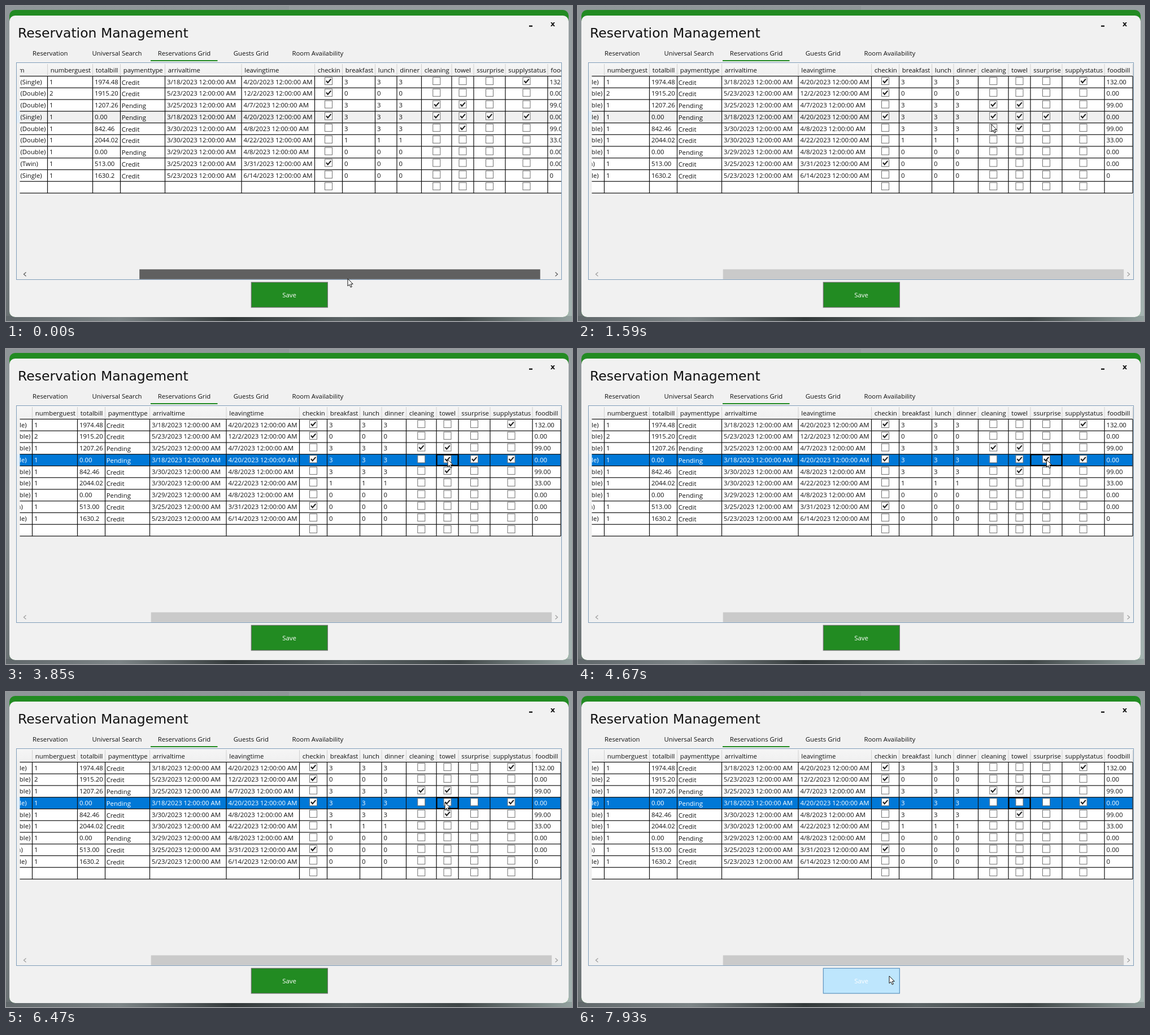
An HTML page with a canvas that plays this animation: 1002x559 px, repeating every 7990 ms.

```html
<!DOCTYPE html>
<html lang="en">
<head>
<meta charset="utf-8">
<title>Reservation Management</title>
<style>
html, body { margin: 0; width: 100%; height: 100%; overflow: hidden; background: #858d90; }
canvas { display: block; }
</style>
</head>
<body>
<canvas id="stage" width="1002" height="559"></canvas>
<script>
const ctx = document.getElementById('stage').getContext('2d');
const LOOP = 7990, STEP = 57;
const UI = '11.35px "Open Sans", "Noto Sans", sans-serif';
const GREEN = '#228b22', INK = '#111';
const LEFT = 25, TOP = 124.5, ROW_H = 20.75, SELECTED = 3;

// Each column's name and width, as laid out at the far right scroll position
let edge = -40;
const columns = [
  ['', 86.5], ['numberguest', 80], ['totalbill', 49], ['paymenttype', 79], ['arrivaltime', 135.5],
  ['leavingtime', 129.5], ['checkin', 49], ['breakfast', 58], ['lunch', 38.5], ['dinner', 43.5],
  ['cleaning', 53.5], ['towel', 39], ['ssurprise', 56], ['supplystatus', 75], ['foodbill', 50]
].map(([name, width]) => ({ name, width, x: (edge += width) - width }));
const PAYMENT = 3;

// room | guests | bill | payment | arrival | leaving | each meal | checked columns | food bill
const rows = [
  'Single|1|1974.48|Credit|3/18|4/20|3|checkin supplystatus|132.00',
  'Double|2|1915.20|Credit|5/23|12/2|0|checkin|0.00',
  'Double|1|1207.26|Pending|3/25|4/7|3|cleaning towel|99.00',
  'Single|1|0.00|Pending|3/18|4/20|3|checkin cleaning towel ssurprise supplystatus|0.00',
  'Double|1|842.46|Credit|3/30|4/8|3|towel|99.00',
  'Double|1|2044.02|Credit|3/30|4/22|1||33.00',
  'Double|1|0.00|Pending|3/29|4/8|0||0.00',
  'Twin|1|513.00|Credit|3/25|3/31|0|checkin|0.00',
  'Single|1|1630.2|Credit|5/23|6/14|0||0',
  '||||||||'
].map(line => {
  const [room, guests, bill, pay, from, to, meal, checked, food] = line.split('|');
  const date = d => d && d + '/2023 12:00:00 AM';
  const has = name => checked.split(' ').includes(name);
  return [room && `(${room})`, guests, bill, pay, date(from), date(to), has('checkin'), meal, meal, meal,
    ...['cleaning', 'towel', 'ssurprise', 'supplystatus'].map(has), food];
});

// When each cell of the selected row is focused and cleared
const focusAt = [[2230, 'cleaning'], [3850, 'towel'], [4460, 'ssurprise'], [6470, 'towel']];
const clearAt = { cleaning: 3100, ssurprise: 5600, towel: 6980 };

// Pointer moves: start, end, target x, target y
const moves = [
  [120, 230, 631, 486],
  [980, 1650, 735, 202],
  [1900, 2080, 734, 199],
  [2420, 2540, 747, 199],
  [2750, 2860, 735, 197],
  [3160, 3510, 782, 196],
  [3900, 4120, 831, 196],
  [4670, 4760, 824, 198],
  [5640, 5890, 790, 197],
  [6010, 6130, 777, 196],
  [7260, 7780, 551, 504]
];

// Advances in even steps, the first one at the start time
function progress(t, start, end) {
  if (t < start) return 0;
  if (t >= end) return 1;
  const last = Math.round((end - start) / STEP);
  return (Math.floor((t - start) / (end - start) * last) + 1) / (last + 1);
}

const ease = p => p ** 3 * (10 - 15 * p + 6 * p * p);

function pointer(t) {
  let x = 605, y = 484;
  for (const [start, end, tx, ty] of moves) {
    const e = ease(progress(t, start, end));
    x += (tx - x) * e;
    y += (ty - y) * e;
  }
  return [x, y];
}

function rect(x, y, w, h, color) {
  ctx.fillStyle = color;
  ctx.fillRect(x, y, w, h);
}

function rounded(x, y, w, h, color) {
  ctx.beginPath();
  ctx.roundRect(x, y, w, h, 10);
  ctx.fillStyle = color;
  ctx.fill();
}

function frame(x, y, w, h, color, width = 1) {
  ctx.strokeStyle = color;
  ctx.lineWidth = width;
  ctx.strokeRect(x, y, w, h);
}

function poly(points, color, width) {
  ctx.beginPath();
  points.forEach(([x, y]) => ctx.lineTo(x, y));
  ctx.strokeStyle = color;
  ctx.lineWidth = width;
  ctx.stroke();
}

function text(str, x, y, color = INK, font = UI, align = 'left') {
  ctx.font = font;
  ctx.textAlign = align;
  ctx.fillStyle = color;
  ctx.fillText(str, x, y);
}

function gradient(x1, y1, ...colors) {
  const g = ctx.createLinearGradient(0, 0, x1, y1);
  colors.forEach((c, i) => g.addColorStop(i / (colors.length - 1), c));
  return g;
}

function drawWindow() {
  rect(0, 0, 501, 559, gradient(0, 559, '#8f9699', '#878e91', '#6a7173'));
  rect(501, 0, 501, 559, gradient(0, 559, '#959c9f', '#9aa4a5', '#a5b4b1'));
  rect(0, 550, 1002, 9, gradient(1002, 0, '#60676a', '#7d8587', '#33393a', '#5b6365', '#3f4647', '#93a19f'));
  rounded(6, 7, 990, 545, GREEN);
  rounded(6, 17, 990, 535, '#f1f1f1');

  text('Reservation Management', 21, 56, INK, '23.5px "DejaVu Sans", sans-serif');
  rect(926, 34.5, 6, 2.3, INK);
  text('x', 968, 36, INK, 'bold 13px "DejaVu Sans", sans-serif', 'center');
  [['Reservation', 47], ['Universal Search', 152.6], ['Reservations Grid', 268.7], ['Guests Grid', 402.8], ['Room Availability', 506.5]]
    .forEach(([label, x]) => text(label, x, 88));
  rect(256, 96, 118.5, 2, GREEN);
}

function drawCheck(x, y, on) {
  rect(x - 6.5, y - 6.5, 13, 13, '#fff');
  frame(x - 6.5, y - 6.5, 13, 13, '#707070');
  if (on) poly([[x - 4, y - .3], [x - 1.3, y + 3], [x + 4.3, y - 3.5]], '#212121', 2.2);
}

function drawCell(value, column, x, y, color, cleared) {
  if (typeof value === 'boolean') {
    drawCheck(x + column.width / 2, y + 8.6, value && !cleared);
  } else {
    const payment = column === columns[PAYMENT];
    text(value, column.name ? x + (payment ? 2.2 : 3.4) : x + 38.4, y + (payment ? 15 : 14), color);
  }
}

function drawGrid(t, shift) {
  const focus = focusAt.findLast(([start]) => t >= start);
  const bottom = TOP + ROW_H * rows.length, right = edge + shift;
  const selectedY = TOP + SELECTED * ROW_H;

  rect(19, 101, 964, 384, '#f0f0f0');
  rect(19, 101, 964, 23, gradient(0, 124, '#fff', '#fff', '#f0f0f0'));
  rect(19, selectedY, 6, ROW_H, '#e3eff9');
  ctx.save();
  ctx.beginPath();
  ctx.rect(LEFT - .5, 101, 958.5, 384);
  ctx.clip();
  rect(0, TOP, right, bottom - TOP, '#fff');
  rect(0, selectedY, right, ROW_H, focus ? '#0078d7' : '#f0f0f0');
  for (let r = 0; r <= rows.length; r++) rect(0, TOP + r * ROW_H - .6, right, 1.2, INK);

  text('m', 5.5 + shift, 118, INK, UI, 'right');
  columns.forEach((column, c) => {
    const x = column.x + shift, end = x + column.width;
    text(column.name, x + 5.3, 118);
    rect(end - .5, 103, 1, 20, '#cfcfcf');
    rect(end - .6, TOP, 1.2, bottom - TOP, INK);
    rows.forEach((cells, r) => {
      const chosen = r === SELECTED;
      drawCell(cells[c], column, x, TOP + r * ROW_H, chosen && focus ? '#fff' : INK, chosen && t >= clearAt[column.name]);
    });
    if (focus && focus[1] === column.name) frame(x + .5, selectedY + .7, column.width - 1, ROW_H - 1.4, '#000', 2);
  });
  ctx.restore();
  frame(18.5, 100.5, 965, 385, '#7f9db9');
}

function drawScrollbar(t, travel, y) {
  const pressed = t < 980, hover = y >= 467 && y < 485;
  const arrow = pressed || hover ? '#606060' : '#a0a0a0';
  rect(24, 467, 959, 18, '#f0f0f0');
  rect(236.2 + travel, 467.3, 709.5, 17.5, pressed ? '#606060' : hover ? '#a6a6a6' : '#cacaca');
  [[33.5, 1], [974.5, -1]].forEach(([x, d]) =>
    poly([[x + 2 * d, 472.5], [x - 2 * d, 476], [x + 2 * d, 479.5]], arrow, 1.3));
}

function drawSave(x, y) {
  const hover = x >= 434 && x <= 569 && y >= 490 && y <= 535;
  rect(434, 490, 135.5, 45, hover ? '#bee6fd' : GREEN);
  frame(434.3, 490.3, 135, 44.5, hover ? '#5b93bf' : '#707070', 1.2);
  text('Save', 501.5, 517, '#fff', UI, 'center');
}

function drawPointer(x, y) {
  ctx.beginPath();
  [[0, 0], [0, 13], [3, 10.3], [5.2, 15.2], [7.3, 14.2], [5.2, 9.4], [9.2, 9.4]]
    .forEach(([dx, dy]) => ctx.lineTo(x + dx, y + dy));
  ctx.closePath();
  ctx.fillStyle = '#fff';
  ctx.fill();
  ctx.strokeStyle = INK;
  ctx.lineWidth = 1;
  ctx.stroke();
}

function draw(now) {
  const t = now % LOOP;
  const [x, y] = pointer(t);
  const scroll = progress(t, 120, 230);
  drawWindow();
  drawGrid(t, 27 * (1 - scroll));
  drawScrollbar(t, 20.5 * scroll, y);
  drawSave(x, y);
  drawPointer(x, y);
  requestAnimationFrame(draw);
}
requestAnimationFrame(draw);
</script>
</body>
</html>
```
